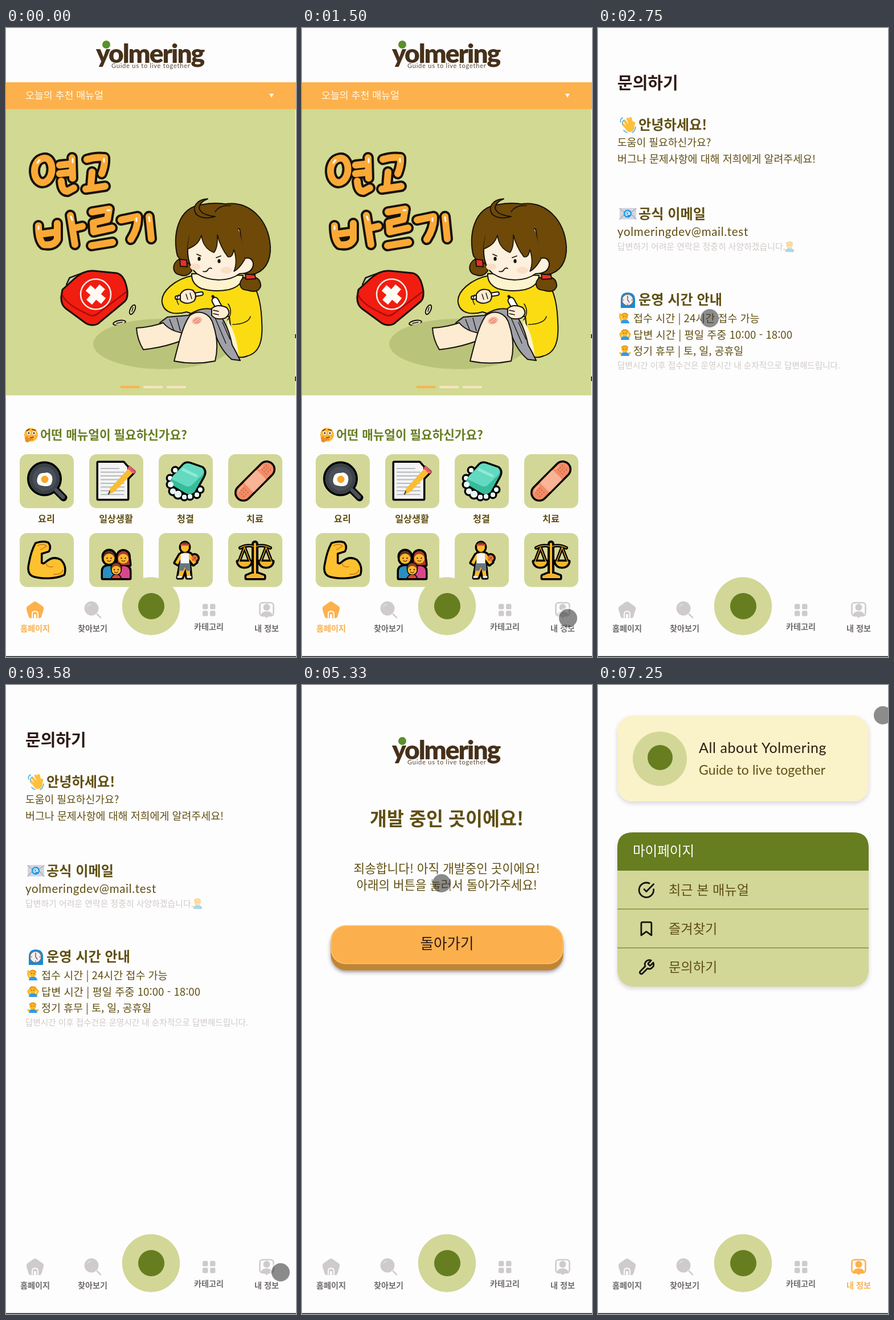
Write an HTML page that moves like this. It is 509 px wide and 1101 px high and loops after 7330 ms.

```html
<!DOCTYPE html>
<html lang="ko">
<head>
<meta charset="utf-8">
<title>Yolmering</title>
<style>
html, body { margin: 0; width: 100%; height: 100%; overflow: hidden; background: #fefdfe; }
svg { display: block; width: 100vw; height: 100vh; }
text { font-family: "Noto Sans CJK KR", "Noto Sans CJK", sans-serif; white-space: pre; }
.latin { font-family: Lato, sans-serif; }
.line { fill: none; stroke-linecap: round; stroke-linejoin: round; }
</style>
</head>
<body>
<svg id="stage" viewBox="0 0 509 1101"></svg>
<script>
const LOOP = 7330, STEP = 1000 / 12;
const SAGE = '#d2d797', LEAF = '#667d20', AMBER = '#fcb14c', OLIVE = '#5f4f12', DARK = '#2e1a14', GREY = '#cfcbcd';
const INK = '#17120c', SKIN = '#fdebd2', HAIR = '#6e4908', EMOJI = '#fcb92c', BLUE = '#2f9be6';

// Hangul text centred vertically on cy
const ko = (s, x, cy, size, fill, weight = 400, anchor = 'start') =>
  `<text x="${x}" y="${cy + size * .36}" font-size="${size}" fill="${fill}" font-weight="${weight}" text-anchor="${anchor}">${s}</text>`;
const en = (s, x, y, size, fill, gap = 0, weight = 400) =>
  `<text class="latin" x="${x}" y="${y}" font-size="${size}" fill="${fill}" letter-spacing="${gap}" font-weight="${weight}">${s}</text>`;
const box = (x, y, w, h, r, fill, more = '') => `<rect x="${x}" y="${y}" width="${w}" height="${h}" rx="${r}" fill="${fill}" ${more}/>`;
const dot = (x, y, r, fill, more = '') => `<circle cx="${x}" cy="${y}" r="${r}" fill="${fill}" ${more}/>`;
const oval = (x, y, rx, ry, fill, turn = 0, more = '') =>
  `<ellipse cx="${x}" cy="${y}" rx="${rx}" ry="${ry}" fill="${fill}" transform="rotate(${turn} ${x} ${y})" ${more}/>`;
const area = (d, fill, more = '') => `<path d="${d}" fill="${fill}" ${more}/>`;
const line = (d, color, w, more = '') => `<path class="line" d="${d}" stroke="${color}" stroke-width="${w}" ${more}/>`;
const sticker = (shape, extra = '') =>
  `<g stroke="#000" stroke-width="7" stroke-linejoin="round">${shape}</g>${shape}${extra}`;

const logo = y => `<g transform="translate(0 ${y})">` +
  en('yolmering', 158, 61, 46, '#46311a', -2, 900) + dot(176, 29, 7, '#58912d') +
  en('Guide us to live together', 185, 70, 11.2, '#5b4a38', .7) + '</g>';

function balloonWords() {
  const d = 'M66 228C84 225 86 263 68 270C47 276 42 232 66 228ZM94 240L112 238M94 255L112 253' +
    'M116 227L117 263M97 268Q98 286 108 286L119 280M142 230Q158 225 173 227Q174 240 168 255M151 252L149 276M140 282L174 277' +
    'M57 346Q57 372 66 379Q84 382 90 370L90 342M60 361L90 357M113 328L121 379M121 350L134 347' +
    'M151 322L181 317L178 335L153 341L154 357L186 350M150 381L187 375M202 336L231 330Q232 350 219 370M251 330L255 369';
  return line(d, INK, 20) + line(d, '#fba936', 12) +
    line('M55 236L59 231M117 229V235M172 229V234M57 347V352M114 330L116 336M178 319L182 319M229 333V338M251 331L252 338', '#fff', 3);
}

function aidKit() {
  return line('M107 449L112 438L139 428', INK, 4) + line('M108 449L113 439L139 429', '#e8e8df', 1.4) +
    area('M99 458L121 438Q137 424 153 425L194 429Q209 432 213 461Q214 474 208 479L161 518Q150 523 139 516L105 491Q96 484 97 470Z', '#f11d10', `stroke="${INK}" stroke-width="3"`) +
    line('M99 467Q104 484 148 503Q155 505 161 500L211 462', '#a70d08', 2.5) +
    dot(157.5, 466, 26.5, '#f11d10', 'stroke="#f6eeea" stroke-width="2.5"') +
    line('M144 455L171 478M169 453L146 480', '#fffaf4', 13, 'style="stroke-linecap:butt"') +
    oval(199, 516, 11, 4, '#e6dfb0', -10, `stroke="${INK}" stroke-width="2"`) + line('M194 517L204 515', INK, 1.5) +
    oval(222, 493, 4, 9, '#e6dfb0', 25, `stroke="${INK}" stroke-width="2"`) + line('M221 496L223 489', INK, 1.5);
}

function girl() {
  const o = `stroke="${INK}" stroke-width="2" stroke-linejoin="round"`;
  return oval(275, 553, 122, 44, '#bac37a') +
    // pigtails and back hair
    area('M303 405C291 412 291 430 305 432Q318 437 326 425L320 405Z', HAIR, o) +
    area('M345 309C300 313 292 366 301 399Q310 412 322 412L430 432C454 428 465 408 464 383C461 336 428 302 385 308Q364 305 345 309Z', HAIR, o) +
    // sweater
    area('M330 433C296 439 271 462 274 481C278 501 299 502 317 497L326 500L392 505L400 572Q410 580 424 574C446 568 451 545 449 515C448 480 440 451 424 437Z', '#fbdc12', o) +
    area('M388 512Q404 530 409 577Q400 573 392 551Z', '#fdf3cf') +
    // skirt and legs
    area('M283 506L270 516Q280 533 302 537L330 521L352 515L367 535Q377 564 396 580L411 582Q404 567 397 555C391 525 379 500 361 492Q340 488 320 503Z', '#9fa0a8', o) +
    line('M287 510L296 533M300 508L306 530M366 505L386 552M380 515L393 545', INK, 1.3) +
    area('M229 525Q252 524 276 516Q288 531 312 534L306 548Q277 559 241 563Q230 545 229 525Z', SKIN, o) +
    area('M295 583C303 553 310 520 323 503C341 490 360 502 364 520C372 544 371 567 367 583Q330 590 295 583Z', SKIN, o) +
    oval(335, 512, 9, 6, '#f5b7a0', -20) + line('M330 513L336 508M332 517L340 510M336 517L341 514', '#e8796a', 1.2) +
    // collar and face
    area('M326 430Q325 448 343 456Q366 463 391 458Q415 452 416 433Z', '#fdf3cf', o) +
    area('M322 365C315 395 320 418 335 430C360 446 393 443 410 430Q434 430 434 412Q431 399 418 404L410 352L345 340Z', '#fdf0dc', o) +
    oval(332, 418, 9, 6, '#fbdfc4') + oval(387, 424, 10, 6, '#fbdfc4') +
    oval(339, 404, 2.6, 3.6, INK) + oval(374, 408, 2.6, 3.6, INK) +
    line('M335 396L342 399M369 402L377 399M346 426Q352 428 355 422Q358 419 361 421', INK, 1.7) +
    // fringe
    area('M319 388C320 360 327 338 346 330Q375 316 402 342Q416 365 419 405Q410 421 400 426Q407 409 400 388Q397 404 389 400Q376 383 371 362Q372 385 365 393Q346 386 343 363Q338 380 319 388Z', HAIR) +
    line('M320 386Q338 380 343 363Q346 386 365 393Q372 385 371 362Q376 383 389 400Q397 404 400 388Q407 409 400 426Q410 421 419 405', INK, 1.6) +
    area('M354 299C333 300 325 316 335 327Q347 336 367 330Q340 327 339 314Q341 304 354 299Z', HAIR, o) +
    line('M367 322Q375 309 394 311', INK, 1.5) +
    area('M417 437C407 444 409 459 424 459Q443 465 447 452Q447 439 436 436Z', HAIR, o) +
    area('M305 405L317 406L318 418L306 417Z', '#ed3023', o) + area('M420 431L437 432L438 439L421 440Z', '#ed3023', o) +
    // hands, swab and tube
    line('M300 472L343 465', INK, 8) + line('M300 472L343 465', '#fff', 4) +
    area('M306 466Q313 454 328 459Q337 468 330 478Q316 486 306 477Z', SKIN, o) +
    line('M303 484Q297 476 303 467M316 466L319 475M323 464L326 474', INK, 1.4) +
    line('M367 477L377 495', INK, 13) + line('M367 477L377 495', '#fff', 9) + line('M363 470L364 471', INK, 5) +
    area('M361 491Q371 482 387 489Q397 500 384 508Q368 512 361 503Z', SKIN, o) +
    line('M364 494L373 496M364 500L373 502M390 483Q399 497 389 511M429 505Q425 518 398 519', INK, 1.5);
}

function iconPan() {
  return line('M88 809L101 822', '#000', 13) + sticker(dot(67.5, 789, 27, '#3b4147'),
    dot(67.5, 789, 21, '#484f57') + line('M88 809L100 821', '#4a5158', 7) +
    area('M56 785C59 777 66 780 72 778C82 780 83 789 80 797C77 804 68 802 62 801C54 800 53 792 56 785Z', '#fff') + dot(68, 790, 6.5, '#f9a826'));
}
function iconMemo() {
  const rows = Array.from({ length: 8 }, (_, i) => `M167 ${771 + i * 6.5}H${i ? 207 : 198}`).join('');
  const pencil = area('M180 816L183 806L216 770L224 777L190 812Z', '#f9bd35');
  return sticker(area('M162 761H206L213 769V824H162Z', '#f4f4f4') + pencil,
    line(rows, '#b6b9bd', 2) + pencil + line('M217 770L224 777', '#e7596b', 6) + line('M180 816L182 811', '#333', 2));
}
function iconSoap() {
  const suds = [[288, 788, 4], [289, 799, 5], [293, 811, 5], [302, 816, 6], [313, 821, 4], [323, 820, 4], [335, 817, 4], [341, 808, 4], [297, 774, 4]];
  const foam = suds.map(([x, y, r]) => dot(x, y, r, '#f2fbfb')).join('');
  return sticker(foam + area('M310 767Q315 760 324 763L344 770Q351 776 346 785L331 812Q323 819 315 814L290 799Q286 793 292 786Z', '#36bd9b'),
    area('M310 767Q315 760 324 763L344 770Q350 776 344 783L325 801Q319 805 312 800L293 791Q289 788 294 783Z', '#63dac0') +
    line('M311 773L334 784', '#8cebd6', 5) + suds.slice(1, 7).map(([x, y, r]) => dot(x, y, r, '#e8f7f7')).join(''));
}
function iconPlaster() {
  let holes = '';
  for (const side of [-28, 28]) for (let i = -1; i < 2; i++) for (let j = -1; j < 2; j++) holes += dot(side + i * 5, j * 5, 1.1, '#c85f3e');
  return `<g transform="translate(437 793) rotate(-45)">` + sticker(box(-41, -12, 82, 24, 12, '#f18c66'),
    box(-16, -12, 32, 24, 2, '#f9b395') + holes + line('M-34 -6Q-32 -9 -26 -9H-20M20 -9H28', '#fbb297', 2)) + '</g>';
}
function iconArm() {
  return sticker(area('M53 903Q64 899 73 902Q78 908 74 915L61 919L61 937Q65 941 70 937Q82 925 95 932Q105 942 101 956C86 963 60 963 47 958Q38 953 42 937Q46 915 53 903Z', '#fdc02f'),
    line('M70 937Q73 945 82 943M56 906Q65 901 71 907L61 913M84 956Q96 958 100 949', '#d8891d', 2));
}
function iconFamily() {
  const body = (x, y, w, c) => area(`M${x - w} 963V${y + 9}Q${x - w} ${y} ${x} ${y}Q${x + w} ${y} ${x + w} ${y + 9}V963Z`, c);
  const face = (x, y, r, hair) => dot(x, y - 2, r, hair) + oval(x, y + 2, r - .5, r - 1, EMOJI);
  const smile = (x, y) => dot(x - 3.5, y, 1.2, '#3b2316') + dot(x + 3.5, y, 1.2, '#3b2316') +
    line(`M${x - 3} ${y + 4}Q${x} ${y + 7} ${x + 3} ${y + 4}`, '#6b2b1c', 1.2);
  const adults = body(181, 942, 11, '#288fc2') + body(206, 942, 11, '#d8478c') + area('M196 940V926Q197 916 206 916Q216 917 217 940Z', '#a63b2d') +
    face(181, 927, 10, '#583325') + face(206, 927, 9.5, '#a63b2d');
  const child = body(193.5, 957, 8, '#e2442d') + face(193.5, 947, 8.5, '#8b3d23');
  return sticker(adults, smile(181, 928) + smile(206, 928)) +
    `<g stroke="#000" stroke-width="3">${child}</g>` + child + smile(193.5, 948);
}
function iconPlayer() {
  return sticker(area('M305 922Q315 915 324 921L334 935L329 939L322 930V942L324 962H318L315 946L309 962H302L306 941V930L302 939L297 936Z', EMOJI) +
    oval(314, 909, 7, 8, EMOJI) + dot(331, 928, 5.5, '#ef7531'),
    area('M307 920H321V938H306Z', '#f4f6f7') + area('M305 937H323L324 950H317L314 944L311 950H303Z', '#687680') +
    area('M307 906Q307 900 314 900Q321 900 321 906Z', '#70401e') + line('M307 905H321', '#e7433e', 2.5) +
    line('M302 961H307M319 961H324', '#eef0f2', 3.5) + line('M327 924L335 932M327 932L335 924', '#8d3c19', 1));
}
function iconScales() {
  const gold = '#f6b42e', bowls = 'M407 934H430Q428 943 418.500 943Q409 943 407 934ZM445 934H468Q466 943 456.500 943Q447 943 445 934Z';
  const rig = 'M411 910Q424 903 437 908Q450 903 464 910M418.500 909L409 934M418.500 909L428 934M456.500 909L447 934M456.500 909L466 934';
  return line(rig, '#000', 6) + line('M437 903V956', '#000', 12) +
    sticker(area(bowls + 'M422 963V959L432 955H442L453 959V963Z', gold), line(rig, gold, 1.3) + line('M437 903V956', gold, 4));
}

function homePage() {
  const icons = [iconPan, iconMemo, iconSoap, iconPlaster, iconArm, iconFamily, iconPlayer, iconScales];
  const labels = ['요리', '일상생활', '청결', '치료'];
  const cards = icons.map((icon, i) => box(24 + i % 4 * 122, i < 4 ? 746 : 884, 95, 94.5, 13, SAGE) + icon()).join('');
  return logo(0) + box(0, 95, 509, 47.5, 0, AMBER) + ko('오늘의 추천 매뉴얼', 34, 118, 17.3, '#fffaf0', 500) +
    area('M462 115H470L466 122Z', '#fffaf0') + box(0, 142, 508, 501, 0, '#d1d992') +
    balloonWords() + aidKit() + girl() + box(507.5, 536, 1.5, 7, 0, INK) + box(507.5, 610, 1.5, 8, 0, INK) +
    [201, 241, 282].map((x, i) => box(x, 626.5, 34, 4, 1.5, i ? '#fae5c1' : AMBER)).join('') +
    dot(44, 712, 12, '#fcb83a') + dot(40, 709, 3, '#fff') + dot(49, 709, 3, '#fff') + dot(40, 709, 1.6, '#3a2818') + dot(49, 709, 1.6, '#3a2818') +
    line('M36 705L41 702M46 703L52 704M43 717L48 716', '#5b351a', 1.5) + area('M33 717L38 714L39 718L48 718V721L42 722Q40 727 34 724Z', '#ef8c25') +
    ko('어떤 매뉴얼이 필요하신가요?', 60, 712, 21.3, LEAF, 700) + cards +
    labels.map((s, i) => ko(s, 71 + i * 122, 859, 16.2, OLIVE, 700, 'middle')).join('');
}

function myPage() {
  const icons = ['M22 11.08V12a10 10 0 1 1-5.93-9.14M22 4 12 14.01 9 11.01', 'M19 21l-7-5-7 5V5a2 2 0 0 1 2-2h10a2 2 0 0 1 2 2z',
    'M14.7 6.3a1 1 0 0 0 0 1.4l1.6 1.6a1 1 0 0 0 1.4 0l3.77-3.77a6 6 0 0 1-7.94 7.94l-6.91 6.91a2.12 2.12 0 0 1-3-3l6.91-6.91a6 6 0 0 1 7.94-7.94l-3.76 3.76z'];
  const rows = ['최근 본 매뉴얼', '즐겨찾기', '문의하기'].map((s, i) => {
    const y = 358.5 + i * 67.7;
    return line(icons[i], '#16140f', 2.2, `transform="translate(69.5 ${y - 15}) scale(1.28)"`) + ko(s, 124, y, 23.2, OLIVE);
  }).join('');
  return box(34, 54, 441, 150, 27, '#faf2c9', 'filter="url(#soft)"') + dot(108.5, 129, 47.5, SAGE) + dot(109, 127, 22, LEAF) +
    en('All about Yolmering', 177, 118.5, 25, '#2b1d10', .6) + en('Guide to live together', 177, 157, 23, OLIVE, .1) +
    box(34, 258, 441, 270, 27, SAGE, 'filter="url(#soft)"') + area('M34 325V285Q34 258 61 258H448Q475 258 475 285V325Z', LEAF) +
    ko('마이페이지', 61, 291, 23.5, '#fff') + line('M34 392.3H475M34 460.3H475', '#7f9237', 1.6, 'style="stroke-linecap:butt"') + rows;
}

function helpPage() {
  const person = (y, arms) => line(arms, EMOJI, 3.5) + area(`M40 ${y + 9}Q41 ${y + 2} 47 ${y + 2}Q54 ${y + 2} 55 ${y + 9}Z`, BLUE) +
    dot(47, y - 3, 6, EMOJI) + line(`M42 ${y - 6}Q47 ${y - 11} 52 ${y - 6}`, '#e89a1d', 2.5) + dot(45, y - 3, .8, '#5b351a') + dot(49, y - 3, .8, '#5b351a');
  const title = (s, y) => ko(s, 71, y, 24.2, OLIVE, 700);
  return ko('문의하기', 34, 97, 29, DARK, 700) +
    line('M47 163L54 173M52 159L58 170M57 158L60 168M44 169L52 177M63 166L61 174', '#fcc03b', 4.5) + dot(56, 174, 8, '#fcc03b') +
    line('M40 165Q38 160 43 157M43 168Q42 164 46 161M66 173Q65 181 60 183M45 179Q47 182 51 183', '#4aa8d8', 1.5) +
    title('안녕하세요!', 169) + ko('도움이 필요하신가요?', 34, 200, 18.2, OLIVE) + ko('버그나 문제사항에 대해 저희에게 알려주세요!', 34, 229, 18.4, OLIVE) +
    box(38, 315, 29, 20, 1, '#d5d5df') + line('M38 316L52 327L67 316M38 335L48 324M67 335L57 324', '#a7a8b6', 1.2) + dot(52, 325, 7, '#1597e5') +
    dot(52, 325, 2, 'none', 'stroke="#fff" stroke-width="1.2"') + line('M54 323V326Q57 328 56 324Q53 319 49 322Q46 327 51 329', '#fff', 1.1) +
    title('공식 이메일', 325) + en('yolmeringdev@mail.test', 34, 363.5, 20.5, OLIVE, .7) +
    ko('답변하기 어려운 연락은 정중히 사양하겠습니다.', 34, 383, 14.9, '#cfcac6') +
    `<g opacity=".4" transform="translate(289 -125)">${person(508, 'M40 514L47 511L54 514')}</g>` +
    area('M40 490V474Q41 463 52 463Q64 463 65 474V490Z', '#168bd1') + dot(52, 476, 10, '#f1eff1', 'stroke="#70717d" stroke-width="1.5"') +
    line('M52 476V469M52 476L55 480M44 476H45M59 476H60M52 484V483', '#70545a', 1.4) + title('운영 시간 안내', 475) +
    person(508, 'M42 514L39 507V501') + person(537, 'M42 543L39 536L45 529M53 543L56 536L50 529') + person(565, 'M43 571L39 569M52 571L56 569') +
    ko('접수 시간 | 24시간 접수 가능', 62, 508, 18.5, OLIVE) + ko('답변 시간 | 평일 주중 10:00 - 18:00', 62, 537, 18.7, OLIVE) +
    ko('정기 휴무 | 토, 일, 공휴일', 62, 565, 18.4, OLIVE) + ko('답변시간 이후 접수건은 운영시간 내 순차적으로 답변해드립니다.', 34, 591, 14.6, '#cfcac6');
}

function buildingPage() {
  return logo(69) + ko('개발 중인 곳이에요!', 254, 234, 32.6, OLIVE, 700, 'middle') +
    ko('죄송합니다! 아직 개발중인 곳이에요!', 254, 321, 21.4, OLIVE, 400, 'middle') +
    ko('아래의 버튼을 눌러서 돌아가주세요!', 254, 350, 21.2, OLIVE, 400, 'middle') +
    box(50.5, 424, 408, 75.5, 27, '#bf8536', 'filter="url(#deep)"') + box(50.5, 420.5, 408, 68, 26, '#ffc26a') + box(52, 422, 405, 65, 25, '#fbb04d') +
    ko('돌아가기', 254.5, 453, 25.6, DARK, 400, 'middle');
}

function navBar() {
  const house = area('M48 1005Q51 1003 54 1005L64 1012Q67 1014 66 1018L62 1031Q61 1033 58 1033H44Q41 1033 40 1031L36 1018Q35 1014 38 1012Z', 'currentColor') +
    line('M46 1032V1026Q46 1021 51 1021Q56 1021 56 1026V1032', '#fefdfe', 2) + box(49, 1026, 4, 7, 1, '#fefdfe');
  const lens = dot(150, 1016, 12.5, 'currentColor') + line('M160 1026L166 1032', 'currentColor', 2.5) + line('M143 1013Q145 1009 149 1009', '#e4e1e3', 1.5);
  const tiles = [[345, 1008], [358, 1008], [345, 1020], [358, 1020]].map(([x, y]) => box(x, y, 9.5, 9.5, 2.5, 'currentColor')).join('');
  const badge = box(445.5, 1006, 24, 23, 5, 'none', 'stroke="currentColor" stroke-width="2.6"') + dot(457.5, 1014, 6, 'currentColor') +
    area('M447 1028Q449 1021 457.5 1021Q466 1021 468 1028L462 1029L457.5 1033L453 1029Z', 'currentColor');
  const tabs = [['home', house, '홈페이지', 51, 1051], ['find', lens, '찾아보기', 152, 1051], ['list', tiles, '카테고리', 356, 1048], ['my', badge, '내 정보', 457.5, 1051]];
  return tabs.map(([id, icon, label, x, y]) => `<g id="${id}Tab"><g>${icon}</g>${ko(label, x, y, 14.2, 'inherit', 700, 'middle')}</g>`).join('') +
    dot(254.5, 1012, 50.7, SAGE) + dot(255, 1012, 23, LEAF) + box(0, 1099.5, 509, 1.5, 0, '#222');
}

const pages = { home: homePage, my: myPage, help: helpPage, building: buildingPage };
const shadow = (id, dy, blur, alpha) =>
  `<filter id="${id}" x="-10%" y="-20%" width="120%" height="150%"><feDropShadow dx="0" dy="${dy}" stdDeviation="${blur}" flood-color="#332f3a" flood-opacity="${alpha}"/></filter>`;
document.getElementById('stage').innerHTML = `<defs>${shadow('soft', 3, 3.5, .2)}${shadow('deep', 3, 3, .5)}</defs>` +
  box(0, 0, 509, 1101, 0, '#fefdfe') + Object.entries(pages).map(([id, make]) => `<g id="${id}">${make()}</g>`).join('') + navBar() +
  `<g id="pointer">${dot(0, 0, 17.5, 'none', 'stroke="#fff" stroke-opacity=".4" stroke-width="3"')}${dot(0, 0, 16, '#333', 'fill-opacity=".56"')}</g>`;

const visits = [[0, 'home'], [1666, 'my'], [2666, 'help'], [4333, 'my'], [5333, 'building'], [6250, 'my']];
const path = [[1250, 527, 960], [1500, 467, 1033], [1667, 463, 1030], [2250, 197, 511], [2333, 196, 508], [2833, 196, 508], [3250, 494, 978],
  [3417, 494, 978], [3583, 482, 1028], [4000, 453, 1022], [4417, 453, 1022], [5000, 246, 353], [5083, 245, 347], [5333, 245, 347],
  [5750, 243, 475], [7083, 243, 475], [7250, 500, 53], [7400, 500, 53]];
const el = id => document.getElementById(id);
const pointer = el('pointer');

function pointerAt(t) {
  const i = path.findIndex(p => p[0] > t);
  const [t0, x0, y0] = path[i - 1], [t1, x1, y1] = path[i];
  const u = (t - t0) / (t1 - t0), k = u * u * (3 - 2 * u);
  return [x0 + (x1 - x0) * k, y0 + (y1 - y0) * k];
}

function draw(ms) {
  const t = Math.floor((ms % LOOP + 4) / STEP) * STEP + .5;
  const page = visits.filter(v => v[0] <= t).pop()[1];
  for (const id in pages) el(id).style.display = id === page ? '' : 'none';
  for (const id of ['home', 'find', 'list', 'my']) {
    const tab = el(id + 'Tab');
    tab.style.color = id === page ? AMBER : GREY;
    tab.lastChild.style.fill = id === page ? AMBER : '#706c6c';
  }
  const shown = t >= path[0][0];
  pointer.style.display = shown ? '' : 'none';
  if (shown) pointer.setAttribute('transform', `translate(${pointerAt(t).join(' ')})`);
}

const start = performance.now();
function tick() {
  draw(performance.now() - start);
  requestAnimationFrame(tick);
}
tick();
</script>
</body>
</html>
```
